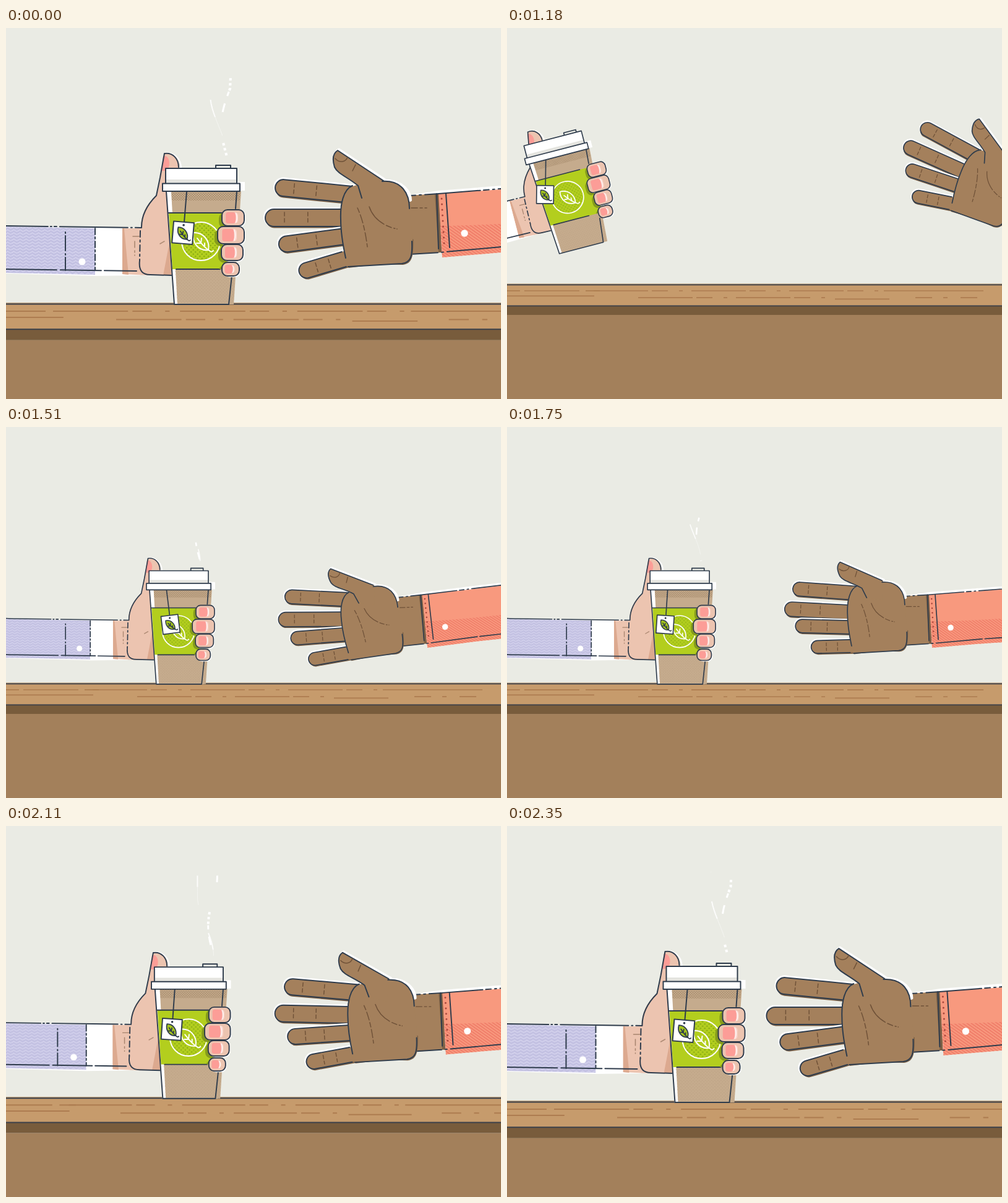
Animation of 800 by 600 pixels, one loop 2380 ms. Source, as an HTML page:

```html
<!DOCTYPE html>
<html lang="en">
<head>
<meta charset="utf-8">
<title>Tea to go</title>
<style>
html, body { margin: 0; width: 100%; height: 100%; overflow: hidden; background: #eaebe4; }
svg { display: block; width: 800px; height: 600px; }
.ln { fill: none; stroke: #2f3c4c; stroke-width: 2; stroke-linecap: round; stroke-linejoin: round; }
.thin { fill: none; stroke: #6f5138; stroke-width: 1.5; stroke-linecap: round; }
.halo { fill: #fff; stroke: #fff; stroke-width: 4; stroke-linejoin: round; }
.wl { fill: none; stroke: #fff; stroke-width: 2; stroke-linecap: round; }
</style>
</head>
<body>
<svg id="stage" viewBox="0 0 800 600" xmlns="http://www.w3.org/2000/svg"></svg>
<script>
const SKIN = '#ecc4b0', SHADE = '#dca98f', NAIL = '#fc9d97';
const BROWN = '#a4805c', DARK = '#7b6046';
const LOOP = 2380;

const p = (d, fill) => `<path d="${d}" fill="${fill}"/>`;
const ln = (d, dash = '', cls = 'ln') =>
  `<path class="${cls}" d="${d}"${dash && ` stroke-dasharray="${dash}"`}/>`;
const rect = (x, y, w, h, fill, more = '') =>
  `<rect x="${x}" y="${y}" width="${w}" height="${h}" fill="${fill}" ${more}/>`;
const dot = (x, y, r, fill) => `<circle cx="${x}" cy="${y}" r="${r}" fill="${fill}"/>`;
const pattern = (id, w, h, body, more = '') =>
  `<pattern id="${id}" width="${w}" height="${h}" patternUnits="userSpaceOnUse" ${more}>${body}</pattern>`;
const dotted = (id, step, r, color) =>
  pattern(id, step, step, dot(step / 4, step / 4, r, color) + dot(step * .75, step * .75, r, color));

const defs = `<defs>
${pattern('waves', 10, 5, '<path d="M-1 4.2L2.5 1.2L7.5 4.2L11 2" fill="none" stroke="#d9d7f0" stroke-width="1.1"/>')}
${pattern('hatch', 4, 4, rect(0, 0, 1.5, 4, '#ee7664'), 'patternTransform="rotate(-55)"')}
${dotted('specks', 4, .9, '#a08465')}${dotted('fine', 5, .6, '#b3977a')}${dotted('green', 7, 1.3, '#8bae14')}
<clipPath id="wrap"><path d="M263 299H366V390H269Z"/></clipPath>
</defs>`;

function table() {
  const X = -300, W = 1400;
  const grain = (y, from, to, dash = '') => ln(`M${from} ${y}H${to}`, dash, 'grain');
  const broken = '88 6 26 18 6 14';
  return `<g transform="matrix(1.2 0 0 1.2 -76.4 -52)">
    ${rect(X, 413.5, W, 1.5, '#b59671')}${rect(X, 415, W, 34, '#c69b6c')}
    ${rect(X, 464, W, 400, '#a3805b')}${rect(X, 449, W, 15, '#785c3c')}
    <g stroke="#ad7c50" stroke-width="1.7" fill="none">
    ${grain(425, 0, 21)}${grain(425, 28, 117)}${grain(425, 127, 150)}${grain(425, 140, 604, broken)}
    ${grain(425, 609, 770)}${grain(433.4, 0, 141)}${grain(436.2, 212, 516, broken)}
    ${grain(438.4, 530, 618)}${grain(436.2, 660, 766, '27 18 7 21')}</g>
    <path d="M${X} 415.4H${X + W}M${X} 449.4H${X + W}" stroke="#3c4049" stroke-width="1.7"/>
  </g>`;
}

function leaf(x, y, s, stroke, fill, w) {
  return `<g transform="translate(${x} ${y}) scale(${s})" stroke="${stroke}" stroke-width="${w / s}" fill="none" stroke-linecap="round" stroke-linejoin="round">
    <path fill="${fill}" d="M-12 -15C4 -16 15 -2 12 13C-4 15 -15 1 -12 -15Z"/>
    <path d="M-6 -6C0 2 8 11 15 15Q18 17 20 14M0 2L1 -6M0 2L-7 2M6 8L6 2"/></g>`;
}

function tag() {
  return `<g id="tag">${ln('M292 265V318')}
    <rect x="275" y="314" width="33" height="35" class="ln" style="fill:#fff"/>
    ${dot(291.5, 319, 1.8, '#2f3c4c')}${leaf(291, 333, .66, '#2f3c4c', '#a5c41c', 1.8)}</g>`;
}

function cup() {
  return p('M259 264H376L364 447H271Z', '#fff') +
    p('M267 264H380L368 447H277Z', '#c5ab8d') +
    p('M267 264H379L378 279H268Z', 'url(#specks)') +
    p('M273 390H371L368 447H277Z', 'url(#fine)') +
    p('M263 299H366V390H269Z', '#b3ce1e') +
    dot(315, 345, 31, 'url(#green)') +
    '<circle class="wl" cx="315" cy="345" r="31"/>' +
    leaf(315, 346, 1, '#fff', '#b3ce1e', 2) +
    ln('M259 264L272 447H360L365 400M371 292L373 264M263 299H351M275 390H346') +
    rect(264, 249, 122, 14, '#fff') + rect(258, 227, 115, 24, '#fff') +
    rect(259, 245, 113, 6, '#e4e4df') + rect(253, 251, 125, 13, '#fff') +
    ln('M258 251V227H373V251M253 251.5H378V264H253ZM339 227V222H363V227') + tag();
}

// fingertips wrapping around the cup: x, y, width, height
const tips = [[349, 294, 36, 26], [342, 321, 43, 28], [348, 350, 35, 26], [349, 379, 28, 22]];

function grip() {
  const each = f => tips.map(([x, y, w, h]) => f(x, y, w, h)).join('');
  return `<g clip-path="url(#wrap)">${each((x, y, w, h) => rect(x - 5, y + 4, w, h, '#869b1c', 'rx="10"'))}</g>` +
    each((x, y, w, h) => rect(x + 3, y, w - 1, h + 2, '#fff', 'rx="9"')) +
    each((x, y, w, h) => `<rect x="${x}" y="${y}" width="${w}" height="${h}" rx="9" class="ln" style="fill:${SKIN}"/>` +
      rect(x + w * .3, y + 4, w * .42, h - 8, '#fbd8cf', 'rx="5"') +
      rect(x + w * .17, y + 4, w * .45, h - 8, NAIL, 'rx="4"') +
      ln(`M${x + w * .62} ${y + 6}q4 ${h / 2 - 6} 0 ${h - 12}`, '', 'wl" stroke-opacity=".6'));
}

function arm() {
  return p('M-600 310C-300 308 -100 318 0 321L217 324V400L144 401L0 397L-600 390Z', '#fff') +
    p('M188 324H218C218 300 228 284 244 270L256 203C270 200 281 211 280 228L284 400H230L188 398Z', SKIN) +
    ln('M258 202C272 201 283 212 283 226', '', 'wl" stroke-width="4') +
    p('M254 207C263 205 268 220 260 231L251 231Z', NAIL) +
    p('M188 324H191L198 399L188 398ZM268 327L270 400H254Z', SHADE) +
    ['#c3c1e2', 'url(#waves)'].map(c => p('M-600 310C-300 308 -100 318 0 321L144 324V399L0 396L-600 389Z', c)).join('') +
    rect(144, 324, 44, 75, '#fff') + dot(123, 378, 5.5, '#fff') +
    ln('M-600 309C-300 307 -100 317 0 320L219 323', '668 4 2 4 4 5 110 5 2 5') +
    ln('M-600 382C-300 388 -100 388 0 390L211 393', '682 6 66 5') +
    ln('M144 324V392', '10 4 3 4') + ln('M96 330V392', '2 4 24 5') +
    ln('M219 322C219 300 230 284 243 271M243 271L249 242L256 203C270 201 279 212 279 225') +
    ln('M217 328L216 376', '10 5 3 5') + ln('M216 376C214 394 222 399 233 399L268 400') +
    ln('M205 337H217M208 345V368', '10 5 3 4', 'thin" stroke-opacity=".55') +
    ln('M249 349L256 345', '', 'thin" stroke-opacity=".5');
}

// knuckle x, y, length, radius, angle, share of the curl
const digits = [
  [565, 270, 117, 13.5, 5.6, -.1],
  [555, 307, 122, 14, 0, .2],
  [555, 336, 102, 13, -7.5, .6],
  [553, 372, 70, 12.5, -16.5, 1]
];

function digit([, , len, r], i) {
  const shape = e => `M${e} ${-r}H${-len}A${r} ${r} 0 0 0 ${-len} ${r}H${e}`;
  const b = 17 - len, c = b + len * .31;
  return `<g id="digit${i}">
    <path class="halo" transform="translate(-1 -1.5)" d="${shape(0)}Z"/>
    <g transform="translate(1 2.5)">${p(shape(0) + 'Z', DARK)}</g>
    ${p(shape(0) + 'Z', BROWN)}${ln(shape(-7))}
    ${ln(`M${b} ${5 - r}V${r - 5}M${c} ${5 - r}V${r - 5}`, '6 4', 'thin')}</g>`;
}

function taker() {
  const palm = 'M560 256L590 247L612 248C640 248 652 268 652 292L657 340C657 368 655 379 640 381L552 386C546 360 539 330 541 295C542 270 548 260 560 256Z';
  const edge = 'L569 255C552 241 536 236 531 225C527 212 528 203 536 198Z';
  const stitches = Array.from({length: 9}, (_, i) => dot(704 + i * .5, 276 + i * 9, 1.5, '#a8483e')).join('');
  return `<g id="sleeve">
    ${p('M645 271L700 263L800 255C1000 240 1200 224 1500 194V230L700 300L645 300Z', '#fff')}
    ${p('M630 272L699 268L704 363L630 368Z', BROWN)}
    ${p('M693 268H700L704 363H699Z', DARK)}
    ${p('M699 268L800 261C1000 246 1200 230 1500 200V305C1200 335 1000 350 800 363L705 371Z', '#f8997e')}
    ${p('M702 320C900 318 1200 280 1500 250V305C1200 335 1000 350 800 363L705 371Z', 'url(#hatch)')}
    ${ln('M653 271L699 268L800 260C1000 245 1200 229 1500 199', '9 6 3 6 90 5')}
    ${ln('M652 366L700 363L800 354C1000 340 1200 325 1500 296', '46 6 3 6 90 5')}
    ${ln('M696 268L699 357M711 268L717 355')}${stitches}${dot(741, 332, 5.7, '#fff')}
    ${ln('M655 291H680', '10 4 4 4', 'thin')}</g>
    <path class="halo" transform="translate(2 -1.5)" d="M590 247L612 248C640 248 652 268 652 280L610 290Z"/>
    ${digits.map(digit).join('')}
    <g transform="translate(1.5 2)">${p('M600 380L640 381C655 379 657 368 657 340L640 330L552 380V386Z', DARK)}</g>
    <g id="thumbBack"><path class="halo" transform="translate(2 -1.5)" d="M536 198L612 248${edge}"/></g>
    ${p(palm, BROWN)}
    <g id="thumb">${p('M536 198L612 248L604 285L574 275' + edge, BROWN)}
    ${ln('M610 247L536 198C528 203 527 212 531 225C536 236 552 241 569 255L575 275')}
    ${ln('M532 211C539 219 549 217 552 209M565 221L560 231', '', 'thin')}</g>
    ${ln('M560 255C545 261 540 285 541 310C541 335 546 358 549 372M553 386L640 381C655 379 657 368 656 345M608 248C640 246 652 268 652 292')}
    ${ln('M568 291C576 308 581 330 584 354', '8 4 14 4', 'thin')}
    ${ln('M587 289C593 307 610 321 632 325', '38 4 9 4 2 3', 'thin')}`;
}

document.getElementById('stage').innerHTML = defs + `<g id="cam">${table()}
  <g id="giver"><g id="arm">${arm()}</g><g id="steam"></g>${cup()}<g id="grip">${grip()}</g></g>
  <g id="taker">${taker()}</g></g>`;
const $ = id => document.getElementById(id);
const move = (id, t) => $(id).setAttribute('transform', t);

const clamp = u => Math.min(1, Math.max(0, u));
const smooth = u => u * u * (3 - 2 * u);
const ease = u => (u = clamp(u)) < .5 ? 4 * u ** 3 : 1 - 4 * (1 - u) ** 3;

// height of a puff above the lid, by strand: 0 bends far left, 1 stays near
function drift(strand, d) {
  if (strand === 0) return -27 * smooth(clamp(d / 100));
  return d * .046 - 11.5 * Math.sin(Math.PI * Math.min(d, 110) / 110);
}

function puff(strand, bottom, len, width, opacity) {
  const lo = Math.max(0, bottom), hi = Math.min(134, bottom + len);
  if (hi <= lo) return '';
  const pts = Array.from({length: 5}, (_, i) => {
    const d = lo + (hi - lo) * i / 4;
    return (357 + drift(strand, d)).toFixed(2) + ',' + (208 - d).toFixed(2);
  });
  return `<polyline points="${pts.join(' ')}" fill="none" stroke="#fff" stroke-width="${width}" opacity="${opacity}"/>`;
}

// the same train of dots and streaks rises again and again
function steam(t) {
  let out = '';
  for (let train = 0; train < 2; train++) {
    const base = train * 105 - .2 * (LOOP - t);
    for (let i = 0; i < 3; i++) out += puff(1, base + 2 + i * 8, 4, 4, 1);
    out += puff(0, base + 34, 30, 1, .45) + puff(0, base + 64, 28, 2, .85) +
      puff(1, base + 72, 14, 3, 1) + puff(1, base + 98, 7, 3, 1);
  }
  $('steam').innerHTML = out;
}

function draw(ms) {
  let t = ms % LOOP;
  const empty = t >= 1000 && t < 1060;
  t = t < 1000 ? LOOP : 1060 + 30 * Math.floor((t - 1060) / 30);

  const zoom = (1 + .2 * ease((t - 1712) / 632)) / 1.2;
  move('cam', `translate(382 260) scale(${zoom}) translate(-382 -260)`);
  for (const id of ['giver', 'taker']) $(id).style.display = empty ? 'none' : '';
  if (empty) return;

  const left = 1 - clamp((t - 1030) / 460);          // share of the entrance to go
  const far = left ** 3, lift = smooth(left);
  const apart = 1 - Math.min(1, ease((t - 1693) / 784) / .992);
  const bounce = Math.sin(Math.PI * clamp((t - 1270) / 480));

  const tilt = -19.4 * lift;
  move('giver', `translate(${-620 * far - 57 * apart} ${-81 * lift}) rotate(${tilt} 271 447)`);
  for (const id of ['arm', 'grip']) move(id, `translate(${-1.1 * tilt} 0)`);
  const since = t - 1510;
  const swing = 5.4 * (1 - apart) -
    7 * Math.cos(Math.PI * since / 225) * Math.exp(-Math.max(0, since) / 400);
  move('tag', `rotate(${swing - tilt} 292 265)`);
  steam(t);

  const turn = 31 * lift - 5 * bounce;
  const curl = 15 * apart - 3.5 * bounce - 14 * lift;
  move('taker', `translate(${43 * apart + 690 * far - 9 * bounce} ${apart + 9 * bounce - 81 * lift}) rotate(${turn} 600 320)`);
  move('sleeve', `translate(0 ${.3 * curl}) rotate(${-turn / 2} 680 315)`);
  const trail = .6 * Math.max(0, -turn);
  digits.forEach(([x, y, , , angle, share], i) =>
    move('digit' + i, `translate(${x} ${y}) rotate(${angle + curl * share + trail * (1 - share)})`));
  for (const id of ['thumb', 'thumbBack']) move(id, `rotate(${-.65 * curl} 597 258)`);
}

const start = performance.now();
function tick() {
  draw(performance.now() - start);
  requestAnimationFrame(tick);
}
tick();
</script>
</body>
</html>
```
